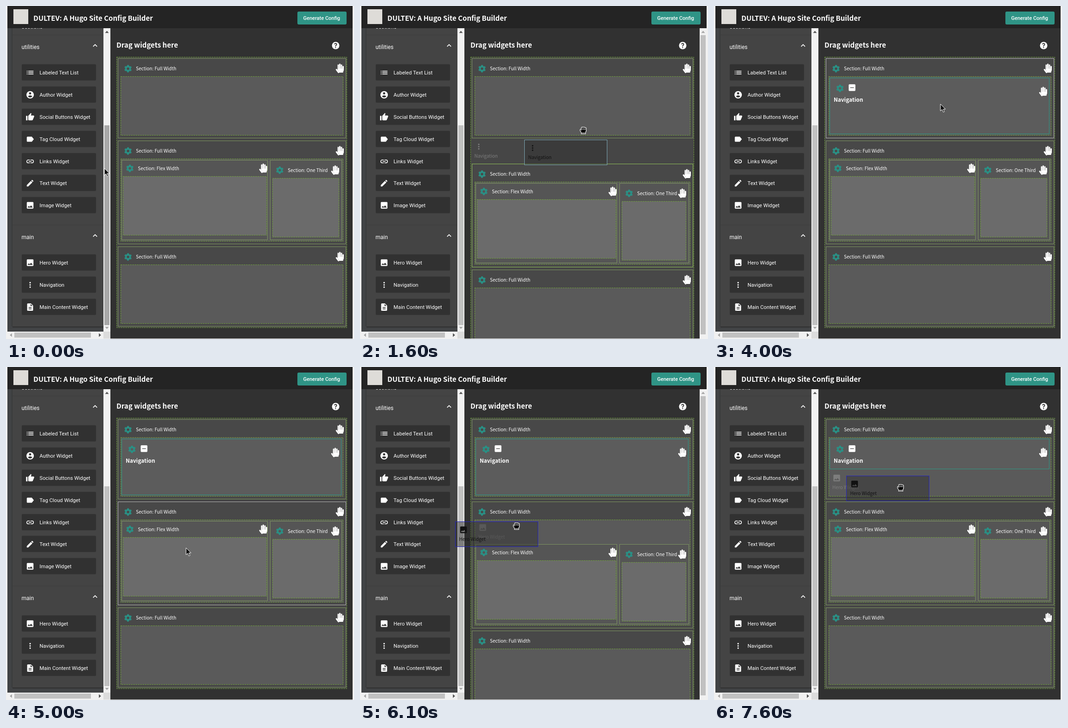
Write an HTML page that moves like this. It is 750x720 px and loops after 8000 ms.

```html
<!DOCTYPE html>
<html lang="en">
<head>
<meta charset="utf-8">
<title>Site config builder</title>
<style>
html, body { margin: 0; width: 100%; height: 100%; overflow: hidden; background: #f0f0f0; }
svg { display: block; width: 750px; height: 720px; }
text { white-space: pre; }
.ui { font: 11.2px Roboto, sans-serif; }
.group { font: 12px Roboto, sans-serif; }
.btn { font: 500 11px Roboto, sans-serif; }
.mark { font: 700 14px Roboto, sans-serif; text-anchor: middle; }
.label, .title, .name { font: 10px "Noto Sans CJK SC", "Noto Sans CJK JP", "Noto Sans CJK", "Noto Sans", sans-serif; }
.title { font-size: 15px; font-weight: 700; }
.name { font-size: 11.8px; font-weight: 700; }
</style>
</head>
<body>
<svg viewBox="0 0 750 720">
  <defs>
    <clipPath id="mainClip"><rect x="225" y="48" width="522" height="671"/></clipPath>
    <clipPath id="sideClip"><rect x="3" y="48" width="207" height="656"/></clipPath>
    <g id="gear" fill="none" stroke="#2a9085">
      <circle r="4.6" stroke-width="3.6"/>
      <circle r="6.8" stroke-width="2.6" stroke-dasharray="3.56" transform="rotate(-105)"/>
    </g>
    <g id="hand" fill="#fff" stroke="#fff" stroke-linecap="round">
      <path d="M5.600 3.200V14M9 1.600V14M12.500 3.200V14M16 6.600V14M1.700 13l4.500 6" stroke-width="3"/>
      <path d="M5 11h12v4l-1.200 4.500H7z" stroke="none"/>
    </g>
    <path id="arrow" d="M0 0V15l3.500-3.200 2.600 5.800 2.500-1.100-2.500-5.500h4.700z" fill="#111" stroke="#fff"/>
    <g id="fist" stroke="#fff" stroke-linejoin="round">
      <path d="M-4 7.500V4.500L-6.500 1V-2.500H-4V-6q1.400-2 2.800-.5q1.400-1.500 2.800 0q1.400-1 2.600.5q1.800-.4 2.300 1.200V1L5 4.500v3z" fill="#000" stroke-width="1.200"/>
      <path d="M-4-2.500V.5M-1.200-5v4M1.600-5v4M4.200-4.500V-1M-3 5.500h7" fill="none"/>
    </g>
  </defs>
  <g id="side" clip-path="url(#sideClip)"></g>
  <g id="bars"></g>
  <g id="main" clip-path="url(#mainClip)"></g>
  <g id="head"></g>
  <g id="over"></g>
</svg>
<script>
const LOOP = 8000, STEP = 100;
const TEAL = '#2f9a84', GREEN = '#72a63a', EDGE = '#7d9460', LIT = '#b4b4b4';
const byId = id => document.getElementById(id);

// Icons on a 24 unit grid: filled outlines, and strokes with their width
const frame = 'M5 3h14q2 0 2 2v14q0 2-2 2H5q-2 0-2-2V5q0-2 2-2z';
const solids = {
  person: 'M12 2a10 10 0 1 0 .1 0zM12 5a3 3 0 1 1-.1 0zM6 16q6-5 12 0q-6 6.500-12 0z',
  thumb: 'M1 9h4v12H1zM7 9l7-8q2 1 1 4l-1 3h7q2 0 2 2.500L19.500 19q-.5 2-2.500 2H9q-2 0-2-2z',
  tag: 'M5 5h11.500L22 12l-5.500 7H5q-2 0-2-2V7q0-2 2-2z',
  pen: 'M3 17.200V21h3.800L18 10l-4-4zM15 5l2.500-2L21 6.500 19 9z',
  image: frame + 'M5 18h14l-4.500-6-3.500 4.500-2.500-3z',
  page: 'M6 2h8l6 6v12q0 2-2 2H6q-2 0-2-2V4q0-2 2-2zM8 12h8v2H8zM8 16h8v2H8zM13 3.500V9h5.500z',
  minus: frame + 'M7 11h10v2H7z'
};
const strokes = {
  list: [2, [8, 12, 16].map(y => `M3 ${y}h2m2 0h14`).join('')],
  link: [1.9, 'M11 8H7a4 4 0 0 0 0 8h4M13 8h4a4 4 0 0 1 0 8h-4M8 12h8'],
  dots: [4, [6, 12, 18].map(y => `M12 ${y}h0`).join(''), 'round'],
  up: [2, 'M6.700 14.700L12 9.400l5.300 5.300']
};

const groups = [
  { top: 88, name: 'utilities', items: { list: 'Labeled Text List', person: 'Author Widget', thumb: 'Social Buttons Widget',
    tag: 'Tag Cloud Widget', link: 'Links Widget', pen: 'Text Widget', image: 'Image Widget' } },
  { top: 499, name: 'main', items: { image: 'Hero Widget', dots: 'Navigation', page: 'Main Content Widget' } }
];

// Pointer moves: start, end, x, y; it rests in between
const moves = [
  [0, 500, 165, 525], [600, 1000, 155, 645], [1000, 1200, 158, 603], [1400, 1600, 481, 269],
  [1600, 2000, 497, 187], [3000, 3100, 488, 212], [4600, 4700, 456, 252], [4800, 5200, 320, 530],
  [5200, 5700, 181, 530], [5900, 6100, 337, 344], [6100, 6500, 400, 348], [7100, 7600, 402, 261]
];

const within = (t, a, b) => t >= a && t < b;
const progress = (t, a, b) => Math.min(1, Math.max(0, (t - a) / (b - a)));
const mix = (a, b, k) => a + (b - a) * k;
const pointer = t => moves.reduce(([x, y], [a, b, toX, toY]) => {
  const k = progress(t, a, b);
  return [mix(x, toX, k), mix(y, toY, k)];
}, [212, 351]);

const box = (x1, y1, x2, y2, fill, stroke, dashed) => {
  const o = stroke ? .5 : 0;
  return `<rect x="${x1 + o}" y="${y1 + o}" width="${x2 - x1 - 2 * o}" height="${y2 - y1 - 2 * o}" fill="${fill}"` +
    (stroke ? ` stroke="${stroke}"` : '') + (dashed ? ' stroke-dasharray="3 2"' : '') + '/>';
};
const text = (cls, x, y, s, fill = '#fff') => `<text class="${cls}" x="${x}" y="${y}" fill="${fill}">${s}</text>`;
const put = (id, x, y) => `<use href="#${id}" x="${x}" y="${y}"/>`;
const tri = (x, y, angle, fill) => `<path d="M-4 2.300H4L0-2.300z" fill="${fill}" transform="translate(${x} ${y}) rotate(${angle})"/>`;
function icon(name, cx, cy, color = '#fff') {
  const [width, line, cap = 'butt'] = strokes[name] || [];
  const paint = line ? `fill="none" stroke="${color}" stroke-width="${width}" stroke-linecap="${cap}"` : `fill="${color}" fill-rule="evenodd"`;
  return `<path d="${line || solids[name]}" ${paint} transform="translate(${cx - 9.6} ${cy - 9.6}) scale(.8)"/>`;
}

function sidebar([cx, cy], dragging) {
  let s = box(3, 48, 210, 704, '#414345') + box(14, 48, 210, 693, '#444') +
    box(14, 693, 210, 695, '#303030') + box(12, 48, 14, 693, '#3a3b3c') +
    text('group', 33.5, 49, 'sections') + icon('up', 192, 45.5);
  for (const { top, name, items } of groups) {
    s += box(14, top - 26, 210, top - 25, '#3d3d3d') + text('group', 33.5, top + 5, name) + icon('up', 192, top - 2.5);
    Object.entries(items).forEach(([kind, label], i) => {
      const y = Math.round(top + 56 + 47.88 * i);
      const hover = !dragging && cx > 33 && cx < 195 && cy > y - 26 && cy < y + 18;
      s += `<rect x="34" y="${y - 18}" width="160" height="35" rx="2" fill="#313131" stroke="${hover ? '#1e1e1e' : '#3a3a3a'}" stroke-width="${hover ? 1.3 : .5}"/>` +
        icon(kind, 52, y) + text('ui', 72.3, y + 4, label);
    });
  }
  return s;
}

function scrollbars(hover) {
  return box(210, 48, 225, 704, '#f1f1f1') + box(212, 258, 223, 690, hover ? '#a8a8a8' : '#c1c1c1') +
    tri(217.5, 56, 0, '#505050') + tri(217.5, 696, 180, '#a3a3a3') +
    box(3, 704, 210, 719, '#f1f1f1') + box(18, 706, 183, 717, '#c1c1c1') +
    tri(10.5, 711.5, -90, '#a3a3a3') + tri(202.5, 711.5, 90, '#505050') + box(210, 704, 225, 719, '#dcdcdc');
}

const ghost = (kind, label, x, y) => icon(kind, x + 9.5, y, '#7d7d7d') + text('label', x, y + 24, label, '#7d7d7d');

function section(y, h, right, edge) {
  return box(241, y, right - 2, y + h, '#484848', edge) + put('gear', 263, y + 22.5) +
    text('label', 280, y + 26, 'Section: Full Width') + put('hand', right - 24.5, y + 11.5) +
    box(247, y + 39, right - 8, y + h - 6, '#5a5a5a', GREEN, true);
}

function nested(x1, x2, y, pad, label) {
  const gx = x1 + 18 + pad * .75, gy = y + 18 + pad, fy = y + 35 + pad;
  return box(x1, y, x2, y + 173, '#555', EDGE) + put('gear', gx, gy) +
    text('label', gx + 17.3, gy + 4, label) + put('hand', x2 - 18.5 - pad * 1.25, gy - 10.5) +
    box(x1 + 3 + pad / 2, fy, x2 - 2 - pad, fy + 128, '#6b6b6b', GREEN, true);
}

function workspace(t, [cx, cy], dragging) {
  // A dragged widget opens a slot between sections, in the second one or in the first
  const gap = within(t, 1500, 1700), inTwo = within(t, 6000, 7200);
  const inOne = within(t, 1700, 2300) || t >= 7200;
  const grow = gap || inTwo ? 50 : 0, R = grow ? 720 : 735, d = grow / 5;
  const y2 = gap ? 341 : 291, ny = 333 + grow;
  const edge = (y, h) => !dragging && cx > 241 && cx < R && cy > y && cy < y + h ? LIT : EDGE;

  let s = box(225, 48, 747, 719, '#313131') + text('title', 238, 90, 'Drag widgets here') +
    `<circle cx="${R - 24.5}" cy="85.5" r="8" fill="#fff"/>` + text('mark', R - 24.5, 90.5, '?', '#313131') +
    box(238, 110, R, 696 + grow, '#464646', GREEN, true) + section(113, 173, R, edge(113, 173));

  if (t >= 2300) {
    const full = t >= 4000;
    s += box(249, 155, R - 12, t >= 7200 ? 221 : 277, '#5c5c5c', TEAL) + put('hand', R - 34.5, full ? 174.5 : 159.5);
    if (full) s += put('gear', 271.5, 178) + icon('minus', 297.5, 176.5) + text('name', 258, 207, 'Navigation');
  }
  if (inOne) s += t < 2300 ? ghost('dots', 'Navigation', 255, 174) : ghost('image', 'Hero Widget', 255, 240);
  if (gap) s += ghost('dots', 'Navigation', 246.5, 304);

  s += section(y2, inTwo ? 274 : 224, R, gap ? '#8fbf58' : edge(y2, 224));
  if (inTwo) s += ghost('image', 'Hero Widget', 255, 347);
  s += nested(249, 564 - d, ny, 0, 'Section: Flex Width') + nested(569 - d, R - 11, ny, 4, 'Section: One Third');
  s += section(520 + grow, 173, R, edge(520, 173));

  if (grow) s += box(732, 48, 747, 719, '#f1f1f1') + box(734, 63, 745, 710, '#c1c1c1') + tri(739.5, 56, 0, '#a3a3a3');
  return s;
}

function overlay(t, [cx, cy], dragging) {
  let s = '';
  if (dragging) {
    const nav = t < 3000, k = progress(t, 6100, 7600);
    const x = Math.round(cx - (nav ? 127 : mix(132, 117, k)));
    const y = Math.round(cy - (nav ? -20 : mix(10, 26, k)));
    s = box(x, y, x + 179, y + 55, 'rgba(45,45,45,.45)', nav ? '#7ba6b4' : '#2323c0') +
      icon(nav ? 'dots' : 'image', x + 18, y + 18, '#111') +
      text('label', x + 8.500, y + 42, nav ? 'Navigation' : 'Hero Widget', '#111');
  }
  const holding = within(t, 1400, 3100) || t >= 5800;
  return s + put(holding ? 'fist' : 'arrow', cx, cy);
}

byId('head').innerHTML = box(3, 0, 747, 48, '#242424') + box(16, 7, 48, 39, '#dedcd8') +
  text('title', 59, 32, 'DULTEV: A Hugo Site Config Builder') +
  '<rect x="628" y="12" width="106" height="28" rx="3" fill="#2f9486"/>' + text('btn', 640.5, 30, 'Generate Config');

let last = -1;
function draw(now) {
  const t = Math.floor(now % LOOP / STEP) * STEP;
  if (t === last) return;
  last = t;
  const at = pointer(t), dragging = within(t, 1500, 2300) || t >= 6000;
  byId('side').innerHTML = sidebar(at, dragging);
  byId('bars').innerHTML = scrollbars(t < 100);
  byId('main').innerHTML = workspace(t, at, dragging);
  byId('over').innerHTML = overlay(t, at, dragging);
}
const start = performance.now();
function tick() {
  draw(performance.now() - start);
  requestAnimationFrame(tick);
}
tick();
</script>
</body>
</html>
```
